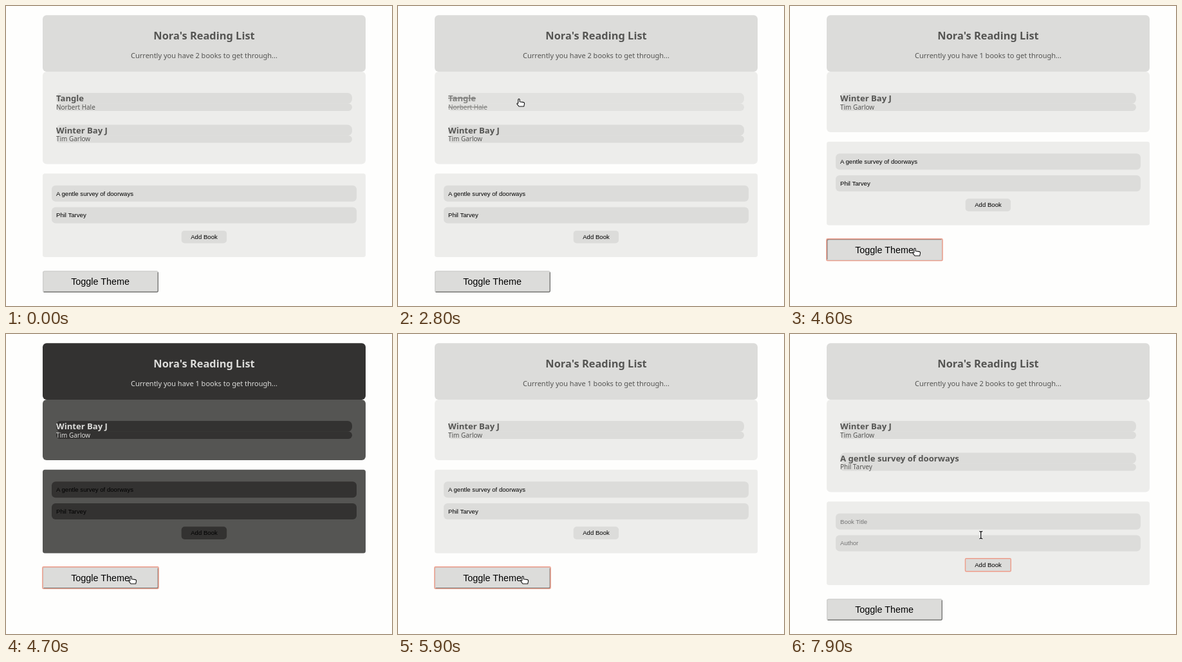
An HTML page that plays this animation: 600 by 466 pixels, repeating every 8 s.

```html
<!DOCTYPE html>
<html lang="en">
<head>
<meta charset="utf-8">
<title>Reading list</title>
<style>
  html, body { margin: 0; width: 100%; height: 100%; overflow: hidden; background: #fefefd; }
  svg { display: block; width: 600px; height: 466px; }
  text { font-family: "Noto Sans", "Open Sans", sans-serif; }
  .form text, .toggle text { font-family: "Liberation Sans", Arial, sans-serif; }
  .bold { font-weight: 700; }
  .struck { opacity: .7; }
  .struck text { text-decoration: line-through; }
</style>
</head>
<body>
<svg id="stage" viewBox="0 0 600 466"></svg>
<script>
const LOOP = 8000, TICK = 100, ROW_STEP = 49.6;
const stage = document.getElementById('stage');

const BOOKS = {
  tangle: ['Tangle', 'Norbert Hale'],
  winter: ['Winter Bay J', 'Tim Garlow'],
  survey: ['A gentle survey of doorways', 'Phil Tarvey']
};
const LIGHT = { box: '#dcdcda', panel: '#ededeb', ink: '#555553' };
const DARK = { box: '#333231', panel: '#555553', ink: '#dcdcda' };

// Pointer moves: start, end, from, bend, to
const MOVES = [
  [1900, 2700, [582, 228], [390, 210], [188, 144]],
  [3200, 4200, [188, 144], [310, 265], [194, 376]],
  [6600, 7300, [194, 376], [240, 345], [296, 311]]
];

const within = (t, a, b) => t >= a && t < b;
const rect = (x, y, w, h, r, fill, extra = '') =>
  `<rect x="${x}" y="${y}" width="${w}" height="${h}" rx="${r}" fill="${fill}" ${extra}/>`;
const label = (x, y, size, fill, str, extra = '') =>
  `<text x="${x}" y="${y}" font-size="${size}" fill="${fill}" ${extra}>${str}</text>`;
const ring = (x, y, w, h) =>
  rect(x, y, w, h, 1.5, 'none', 'stroke="#ee9c89" stroke-width="1.4"');
const MIDDLE = 'text-anchor="middle"';

function pointerAt(t) {
  const move = MOVES.filter(m => t >= m[0]).pop();
  if (!move) return null;
  const [start, end, from, bend, to] = move;
  const p = Math.min(1, (t - start) / (end - start));
  const k = p * p * (3 - 2 * p), j = 1 - k;
  return from.map((v, i) => j * j * v + 2 * j * k * bend[i] + k * k * to[i]);
}

function stateAt(t) {
  const names = t < 3000 ? ['tangle', 'winter'] : t < 7500 ? ['winter'] : ['winter', 'survey'];
  return {
    books: names.map(n => BOOKS[n]),
    shift: (names.length - 2) * ROW_STEP,
    theme: within(t, 4700, 5600) ? DARK : LIGHT,
    pointer: pointerAt(t),
    hoverLag: within(t, 3000, 3100),
    pressed: within(t, 4500, 4700) || within(t, 5400, 5600),
    toggleFocus: within(t, 4500, 7400),
    addFocus: t >= 7400,
    typed: t < 7500
  };
}

function hit(s, x, y, w, h) {
  if (!s.pointer) return false;
  const [px, py] = s.pointer;
  return px >= x && px <= x + w && py >= y && py <= y + h;
}

function header(s) {
  const { box, ink } = s.theme;
  return rect(57, 14.3, 502, 87.7, 6, box) +
    label(308, 51.5, 16.4, ink, "Nora's Reading List", `${MIDDLE} class="bold"`) +
    label(308, 81, 11, ink, `Currently you have ${s.books.length} books to get through...`, MIDDLE);
}

function list(s) {
  const { box, panel, ink } = s.theme;
  const rows = s.books.map(([title, author], i) => {
    const y = 135 + i * ROW_STEP;
    const over = hit(s, 78, y, 460, 28) && !s.hoverLag;
    return `<g class="${over ? 'struck' : ''}">` +
      rect(78, y, 460, 16.8, 7, box) + rect(78, y + 16.6, 460, 11.4, 5.7, box) +
      label(78, y + 12.9, 13.1, ink, title, 'class="bold"') +
      label(78, y + 25.8, 9.95, ink, author) + '</g>';
  });
  return rect(57, 102, 502, 143.6 + s.shift, 6, panel) + rows.join('');
}

function form(s) {
  const { box, panel } = s.theme;
  const y = 260.3 + s.shift;
  const ink = s.typed ? '#000' : '#757575';
  const values = s.typed ? BOOKS.survey : ['Book Title', 'Author'];
  const fields = values.map((v, i) => {
    const top = y + 18.5 + i * 33.7;
    return rect(71, top, 474, 25, 6, box) + label(78, top + 15.9, 9.6, ink, v);
  });
  return '<g class="form">' + rect(57, y, 502, 129.7, 3.5, panel) + fields.join('') +
    rect(272.7, y + 88.6, 70.4, 19.6, s.addFocus ? 2 : 5, box) +
    (s.addFocus ? ring(272.5, y + 88.4, 70.8, 20) : '') +
    label(308, y + 101.7, 9.6, '#000', 'Add Book', MIDDLE) + '</g>';
}

function toggle(s) {
  const y = 411.4 + s.shift;
  const edge = (d, lit) =>
    `<path d="${d}" fill="none" stroke="${lit ? '#cfcfcd' : '#777775'}" stroke-width="1.4"/>`;
  return '<g class="toggle">' + rect(57, y, 180, 33.6, 3, '#dcdcda') +
    edge(`M57.7 ${y + 32} V${y + 3} q0 -2.3 2.3 -2.3 H235.5`, !s.pressed) +
    edge(`M236.3 ${y + 2} V${y + 30.6} q0 2.3 -2.3 2.3 H58.5`, s.pressed) +
    (s.toggleFocus ? ring(56.8, y - .1, 180.3, 33.9) : '') +
    label(146.6, y + 21.7, 14.4, '#000', 'Toggle Theme', MIDDLE) + '</g>';
}

const CURSORS = {
  arrow: 'M0 0 V11.8 L2.8 9.3 L4.8 13.6 L6.8 12.7 L4.9 8.5 H8.4 Z',
  hand: 'M-1.2 7.2 V1.2 Q0 -.7 1.2 1.2 V4.7 L7.3 5.6 Q8.7 6 8.6 7.6 L7.7 12 H0 L-2.9 8.4 Q-3.6 6.6 -1.2 7.2 Z',
  beam: 'M-1.5 -4.5 Q0 -4.3 .7 -3.5 Q1.4 -4.3 3.2 -4.5 M-1.5 7 Q0 6.8 .7 6 Q1.4 6.8 3.2 7 M.7 -3.5 V6'
};

function cursor(s) {
  if (!s.pointer) return '';
  const onRow = s.books.some((_, i) => hit(s, 78, 135 + i * ROW_STEP, 460, 28));
  const onToggle = hit(s, 57, 411.4 + s.shift, 180, 33.6);
  const onField = [278.8, 312.5].some(y => hit(s, 71, y + s.shift, 474, 25));
  // The last field catches the pointer just above its top edge
  const kind = onRow || onToggle ? 'hand' : onField || !s.typed ? 'beam' : 'arrow';
  const d = CURSORS[kind];
  const shape = kind === 'beam'
    ? `<path d="${d}" fill="none" stroke="#fff" stroke-width="3"/>
       <path d="${d}" fill="none" stroke="#111" stroke-width="1.3"/>`
    : `<path d="${d}" fill="#fff" stroke="#111" stroke-width="1.1" stroke-linejoin="round"/>`;
  const [x, y] = s.pointer;
  return `<g transform="translate(${x} ${y})">${shape}</g>`;
}

let shown = -1;
const origin = performance.now();

function draw() {
  const t = Math.floor(((performance.now() - origin) % LOOP) / TICK) * TICK;
  if (t !== shown) {
    shown = t;
    const s = stateAt(t);
    stage.innerHTML = [header, list, form, toggle, cursor].map(part => part(s)).join('');
  }
  requestAnimationFrame(draw);
}
draw();
</script>
</body>
</html>
```
